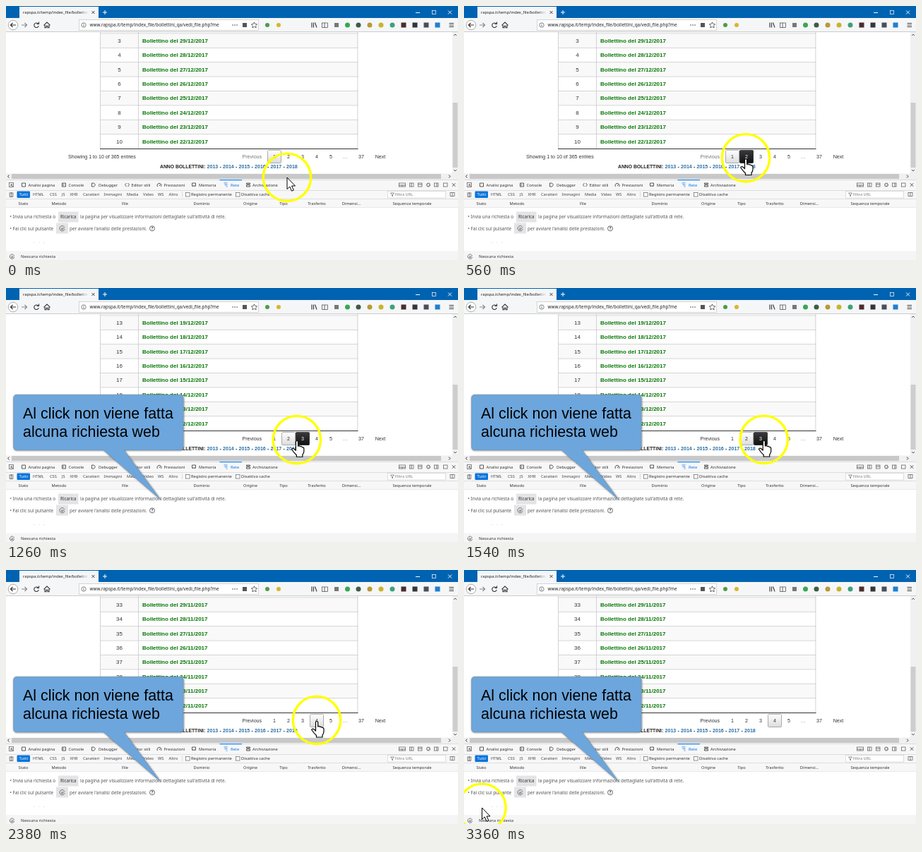
An HTML page that plays this animation: 640 px wide and 360 px high, repeating every 3.6 s.

```html
<!DOCTYPE html>
<html lang="it">
<head>
<meta charset="utf-8">
<style>
html, body { margin: 0; width: 100%; height: 100%; overflow: hidden; background: #fff; }
svg { display: block; width: 100vw; height: 100vh; }
text { white-space: pre; }
.ui { font-family: "Noto Sans", "Open Sans", sans-serif; }
.web { font-family: "Liberation Sans", Arial, sans-serif; }
.b { font-weight: bold; }
</style>
</head>
<body>
<svg id="stage" viewBox="0 0 640 360">
  <defs>
    <linearGradient id="light" x2="0" y2="1"><stop stop-color="#fff"/><stop offset="1" stop-color="#dcdcdc"/></linearGradient>
    <linearGradient id="dark" x2="0" y2="1"><stop stop-color="#3a3a3e"/><stop offset="1" stop-color="#111"/></linearGradient>
    <linearGradient id="fade"><stop stop-color="#f5f6f7" stop-opacity="0"/><stop offset="1" stop-color="#f5f6f7"/></linearGradient>
    <filter id="shadow" x="-10%" y="-10%" width="120%" height="120%"><feDropShadow dx=".5" dy=".5" stdDeviation="1.2" flood-opacity=".6"/></filter>
  </defs>
  <g id="page"></g>
  <g id="chrome"></g>
  <g id="callout"></g>
  <g id="pointer">
    <circle cy="-1.2" r="33.700" fill="none" stroke="#ff0" stroke-width="3.400"/>
    <g stroke="#000" stroke-linejoin="round">
      <path id="arrow" fill="#fff" d="M0 -1V15.500L3.800 12L6.500 18.200L9.300 17L6.600 11H11.500Z"/>
      <path id="hand" fill="#fff" stroke-width="1.200" d="M-1.500 1.500Q0-1 1.700 1.500V8Q3.500 6.500 4.600 8.500Q6.500 7.500 7.400 9.500Q9.800 9 10 11.500V15.500Q9.800 18 8 20V23H-.5V20.500Q-4 17.500-7.200 12.500Q-6.800 10.500-4.200 11.500L-1.500 14Z"/>
      <path id="beam" fill="none" stroke-width="1.200" d="M-3-7.500H-1L0-6.500L1-7.500H3M0-6.500V6.500M-3 7.500H-1L0 6.500L1 7.500H3"/>
    </g>
  </g>
</svg>
<script>
const $ = id => document.getElementById(id);
const LOOP = 3600, STEP = 140, LAST = 3360;
const PAGE_TIMES = [840, 1680, 2380];

// Text is placed by the vertical middle of its capitals.
const text = (x, y, s, size, fill = "#333", cls = "ui", anchor = "start") =>
  `<text x="${x}" y="${y + size * .36}" font-size="${size}" fill="${fill}" class="${cls}" text-anchor="${anchor}">${s}</text>`;
const mid = (x, y, s, size, fill, cls) => text(x, y, s, size, fill, cls, "middle");
const rect = (x, y, w, h, fill, extra = "") =>
  `<rect x="${x}" y="${y}" width="${w}" height="${h}" fill="${fill}" ${extra}/>`;
const dot = (x, y, r, fill, extra = "") => `<circle cx="${x}" cy="${y}" r="${r}" fill="${fill}" ${extra}/>`;
const line = (d, color = "#444", w = 1) => `<path d="${d}" fill="none" stroke="${color}" stroke-width="${w}"/>`;
const box = (x, y, w, h, color = "#555", fill = "none") => rect(x, y, w, h, fill, `stroke="${color}" stroke-width=".7"`);
const cross = (x, y, r, color, w) => line(`M${x - r} ${y - r}l${2 * r} ${2 * r}m0 ${-2 * r}l${-2 * r} ${2 * r}`, color, w);
const gauge = (x, y, r) =>
  line(`M${x + r * .7} ${y - r * .7}A${r} ${r} 0 1 0 ${x + r} ${y + r * .3}M${x - r * .4} ${y}h${r * .9}l${r * .6} ${-r * .5}M${x - r * .4} ${y + r * .45}h${r * .8}`, "#555", .8);

function browserBar() {
  const badges = [[499, "#3f5c45"], [515, "#b89a35"], [531, "#c9b42c"], [547, "#3fa07a"],
    [563, "#4a2d2c"], [579, "#33353b"], [595, "#4a4f5a"], [611, "#1f7fd0"]];
  return rect(0, 0, 640, 17, "#0063b1") + rect(19, 1, 112, 17, "#f5f6f7") +
    text(24, 9, "rapspa.it/temp/index_file/bollettin", 5.75, "#222") + rect(104, 3, 13, 13, "url(#fade)") +
    cross(123.5, 9, 2, "#333", .9) + line("M137 9h6M140 6v6", "#fff") +
    line("M580 9.500h6", "#fff") + box(603.5, 6.5, 5, 5, "#fff") + cross(628.5, 9, 2.5, "#fff", .9) +
    rect(0, 17, 640, 20, "#f5f6f7") + rect(0, 36, 640, 1, "#ccc") +
    dot(10, 27, 6.8, "#fff", 'stroke="#999" stroke-width=".8"') +
    line("M14 27H6.500M9.500 24L6.500 27L9.500 30", "#333", 1.2) +
    line("M22 27h7.500M26.500 24l3 3l-3 3", "#888", 1.2) +
    line("M45.500 25a3.300 3.300 0 1 0 .8 3M46.500 22.500v3h-3", "#333", 1.1) +
    line("M53.500 27.300L58 23L62.500 27.300M55 27v3.700h2v-2.500h2v2.500h2V27", "#333", 1.1) +
    box(103.5, 19.5, 254, 15, "#c5c5c5", "#fff") +
    dot(110, 27, 3.2, "none", 'stroke="#555" stroke-width=".7"') + line("M110 26.500v2.500M110 24.800v.9", "#555", .8) +
    text(118.5, 27, "www.rapspa.it/temp/index_file/bollettini_qa/vedi_file.php?me", 6.38, "#222") +
    [321, 324, 327].map(x => dot(x, 27, .8, "#444")).join("") + rect(335, 24, 6, 6, "#555") +
    `<path d="M351.500 22.800l1.300 2.800 3 .3-2.200 2 .6 3-2.700-1.500-2.700 1.500.6-3-2.200-2 3-.3z" fill="none" stroke="#444" stroke-width=".8"/>` +
    dot(370, 27, 3, "#4f9a4a") + dot(386, 27, 3, "#d8b62e") +
    line("M433 23.500v7M435.500 23.500v7M437.500 23.500l2.500 7", "#444", 1.2) +
    box(447.5, 24, 8, 6.5, "#444") + line("M451 24v6.500", "#444", .8) + rect(465, 24, 6, 6, "#777") +
    dot(483.5, 27, 3.5, "#36a852") + badges.map(([x, c]) => x < 563 ? dot(x, 27, 3.5, c) : rect(x - 3.5, 23.5, 7, 7, c)).join("") +
    line("M627.500 24.500h6.500M627.500 27h6.500M627.500 29.500h6.500", "#444");
}

function scrollBars() {
  return rect(632, 37, 8, 201, "#f0f0f0") + rect(632.5, 137, 7, 92, "#cdcdcd") +
    line("M634 42l2-2l2 2M634 232l2 2l2-2", "#555") +
    rect(0, 237.5, 640, 8.5, "#f0f0f0") + rect(8, 238, 608, 7, "#c8c8c8") +
    line("M4.500 239.500l-2 2l2 2M627 239.500l2 2l-2 2", "#333");
}

function devTools() {
  const tabs = [[25, "Analisi pagina", 31.5], [82, "Console", 88.5], [124, "Debugger", 131], [171, "Editor stili", 177.5],
    [217, "Prestazioni", 223.5], [266, "Memoria", 273], [311, "Rete", 318], [343, "Archiviazione", 349]];
  const filters = [["HTML", 38], ["CSS", 62], ["JS", 79], ["XHR", 90.5], ["Caratteri", 109], ["Immagini", 138.5],
    ["Media", 171], ["Video", 194], ["WS", 215], ["Altro", 230.5]];
  const heads = [["Stato", 24.5], ["Metodo", 75], ["File", 168.5], ["Dominio", 277], ["Origine", 346], ["Tipo", 393],
    ["Trasferito", 440], ["Dimensi...", 489], ["Sequenza temporale", 575]];
  const icons = ["h5v5h-5z", "h5v5h-5zm1 1l1.500 1.500l-1.500 1.500", "h3l2 2.500l-2 2.500h-3z", "m2 0l-2 2.500l2 2.500m2-5l2 2.500l-2 2.500",
    "m0 5a3 3 0 1 1 5 0m-2.500-1l1.500-2", "h5v4h-5zm1 4v1m3-1v1", "h5m-4 2.500h4m-2 2.500h2", "h5v1.500h-5zm0 3h5v2h-5z"];
  return rect(0, 246, 640, 39, "#f7f7f8") +
    [246, 261, 273, 285, 347.5].map(y => rect(0, y, 640, .7, "#d4d4d8")).join("") +
    box(4.5, 250.5, 6, 6) + line("M7 253l3 3M7 253v2.500M7 253h2.500", "#444", .8) +
    rect(302.5, 246, 31.5, 1.2, "#0a84ff") +
    tabs.map(([x, s, tx], i) => {
      const color = s === "Rete" ? "#0a74e0" : "#333";
      return line(`M${x - 2.5} 251${icons[i]}`, color, .8) + text(tx, 253.5, s, 5.75, color);
    }).join("") +
    box(556.5, 251, 9, 5) + line("M556.500 254h9M561 254v2", "#555", .8) +
    [574, 586, 609, 622].map(x => box(x - 2.5, 251, 5.5, 5)).join("") + line("M574 251v5M584 253h5M610 251v5", "#555", .8) +
    dot(598, 253.5, 2.2, "none", 'stroke="#555" stroke-width="1.500" stroke-dasharray="1.1 .6"') + cross(634, 253.5, 2.3, "#444", .9) +
    line("M4.500 265h6M5.200 265.500v5h4.500v-5M7.500 264v6", "#555", .8) +
    rect(15.5, 262.5, 18.5, 9.5, "#0a74dc", 'rx="1.200"') + mid(24.8, 267.2, "Tutti", 5.9, "#fff") +
    filters.map(([s, x]) => text(x, 267.2, s, 5.7, "#444")).join("") +
    rect(249, 263, .6, 8, "#ccc") +
    box(254.5, 264.5, 5.5, 5.5, "#666", "#fff") + text(262, 267.2, "Registro permanente", 5.8) +
    box(325.5, 264.5, 5.5, 5.5, "#666", "#fff") + text(333, 267.2, "Disattiva cache", 5.8) +
    box(540.5, 262.5, 82, 9.5, "#d0d0d0", "#fff") + line("M544.500 265h5l-2 2.500v2.500l-1-1v-1.500z", "#666", .7) +
    text(551, 267.2, "Filtra URL", 5.6, "#777") + box(629, 264.5, 6, 5) + line("M632 264.500v5", "#555", .7) +
    heads.map(([s, x]) => mid(x, 279.5, s, 5.7, "#333")).join("") +
    rect(0, 285.7, 640, 62, "#fff") +
    text(5.5, 299, "• Invia una richiesta o", 6.4, "#555") + rect(74, 291.5, 28.5, 15, "#e4e4e6") +
    mid(88.3, 299, "Ricarica", 6.2, "#333") +
    text(105, 299, "la pagina per visualizzare informazioni dettagliate sull'attività di rete.", 6.42, "#555") +
    text(5.5, 315.3, "• Fai clic sul pulsante", 6.4, "#555") + rect(71, 307.5, 17, 15, "#e4e4e6") + gauge(79.5, 315, 3.6) +
    text(90, 315.3, "per avviare l'analisi delle prestazioni.", 6.42, "#555") +
    dot(207, 315.3, 3.5, "none", 'stroke="#444" stroke-width=".8"') + mid(207, 315.3, "?", 5.5, "#333", "ui b") +
    [39, 46, 53].map(x => rect(x, 335, 1.5, .6, "#ccc")).join("") +
    rect(0, 348.2, 640, 12, "#f5f5f6") + gauge(8.5, 355, 3.2) + text(21, 355.3, "Nessuna richiesta", 5.9);
}

function drawPage(page, hover) {
  let out = rect(133, 37, 366, 166, "#fff");
  for (let i = 0; i < 8; i++) {
    const n = (page - 1) * 10 + 3 + i, y = 49 + 20.4 * i;
    const [yy, mm, dd] = new Date(Date.UTC(2017, 11, 32 - n)).toISOString().slice(0, 10).split("-");
    out += rect(133.5, y - 10.2, 365, 20.4, n % 2 ? "#f9f9f9" : "#fff") + rect(133.5, y - 10.5, 365, .8, "#ccc") +
      mid(160.5, y, n, 8, "#333", "web") + text(193, y, `Bollettino del ${dd}/${mm}/${yy}`, 8, "#087808", "web b");
  }
  out += [133, 187, 497.5].map(x => rect(x, 37, .8, 165.5, "#c8c8c8")).join("") + rect(133, 202, 365.5, 1, "#333");
  out += text(88, 213, `Showing ${page * 10 - 9} to ${page * 10} of 365 entries`, 7.1, "#333", "web");
  out += mid(348.3, 213.3, "Previous", 7.1, page > 1 ? "#333" : "#777", "web");
  for (let n = 1; n <= 5; n++) {
    const x = 360 + 20 * n, current = n === page, hot = n === hover && !current;
    if (current || hot) out += rect(x - 9.5, 204.5, 19, 18, `url(#${hot ? "dark" : "light"})`,
      `rx="1" stroke="${hot ? "#222" : "#999"}" stroke-width=".8"`);
    out += mid(x, 213.3, n, 7.1, hot ? "#fff" : "#333", "web");
  }
  out += mid(480, 213.3, "…", 7.1, "#777", "web") + mid(503, 213.3, "37", 7.1, "#333", "web") +
    mid(530, 213.3, "Next", 7.1, "#333", "web") + text(218, 227.5, "ANNO BOLLETTINI:", 6.8, "#222", "web b");
  for (let i = 0; i < 6; i++) {
    const x = 284.5 + 22.5 * i;
    out += text(x, 227.5, 2013 + i, 7.1, "#2a70a8", "web b");
    if (i < 5) out += mid(x + 19.2, 227.5, "-", 7.1, "#222", "web b");
  }
  return out;
}

// Pointer path: time, x, y
const PATH = [[0, 398, 244], [560, 399, 216.5], [980, 399, 216.5], [1540, 424.7, 216], [1960, 424.7, 216],
  [2240, 440, 214], [2380, 440, 214], [2800, 15, 317.5], [LAST, 25.5, 338]];

function pointerAt(t) {
  const i = Math.max(1, PATH.findIndex(p => p[0] >= t));
  const [t0, x0, y0] = PATH[i - 1], [t1, x1, y1] = PATH[i];
  const u = (t - t0) / (t1 - t0), k = u * u * (3 - 2 * u);
  return [x0 + (x1 - x0) * k, y0 + (y1 - y0) * k];
}

$("chrome").innerHTML = browserBar() + scrollBars() + devTools();
$("callout").innerHTML =
  `<path d="M15 151.500H246Q251 151.500 251 156V225Q251 229.700 246 229.700H167L218.500 299.500L138 229.700H15Q10.700 229.700 10.700 225V156Q10.700 151.500 15 151.500Z"
    fill="#6ca6dd" stroke="#7590a8" stroke-width=".7" filter="url(#shadow)"/>` +
  text(24, 177, "Al click non viene fatta", 21.4, "#000", "web") +
  text(24, 203, "alcuna richiesta web", 21.4, "#000", "web");

let shown = "";
function frame(now) {
  const t = Math.min(LAST, Math.floor(now % LOOP / STEP) * STEP);
  const [x, y] = pointerAt(t);
  const page = 1 + PAGE_TIMES.filter(p => t >= p).length;
  const hover = y > 204 && y < 223 && x >= 370 && x < 470 ? Math.floor((x - 350) / 20) : 0;
  const overYear = y >= 223 && y < 232 && x > 284 && x < 414;
  const overText = y > 292 && y < 322 && x < 312;
  const shape = hover || overYear ? "hand" : overText ? "beam" : "arrow";

  if (shown !== `${page},${hover}`) {
    $("page").innerHTML = drawPage(page, hover);
    shown = `${page},${hover}`;
  }
  for (const id of ["arrow", "hand", "beam"]) $(id).style.display = id === shape ? "" : "none";
  $("pointer").setAttribute("transform", `translate(${x} ${y})`);
  $("callout").setAttribute("opacity", Math.max(0, Math.min(1, (t - 700) / 280)));
  requestAnimationFrame(frame);
}
requestAnimationFrame(frame);
</script>
</body>
</html>
```
